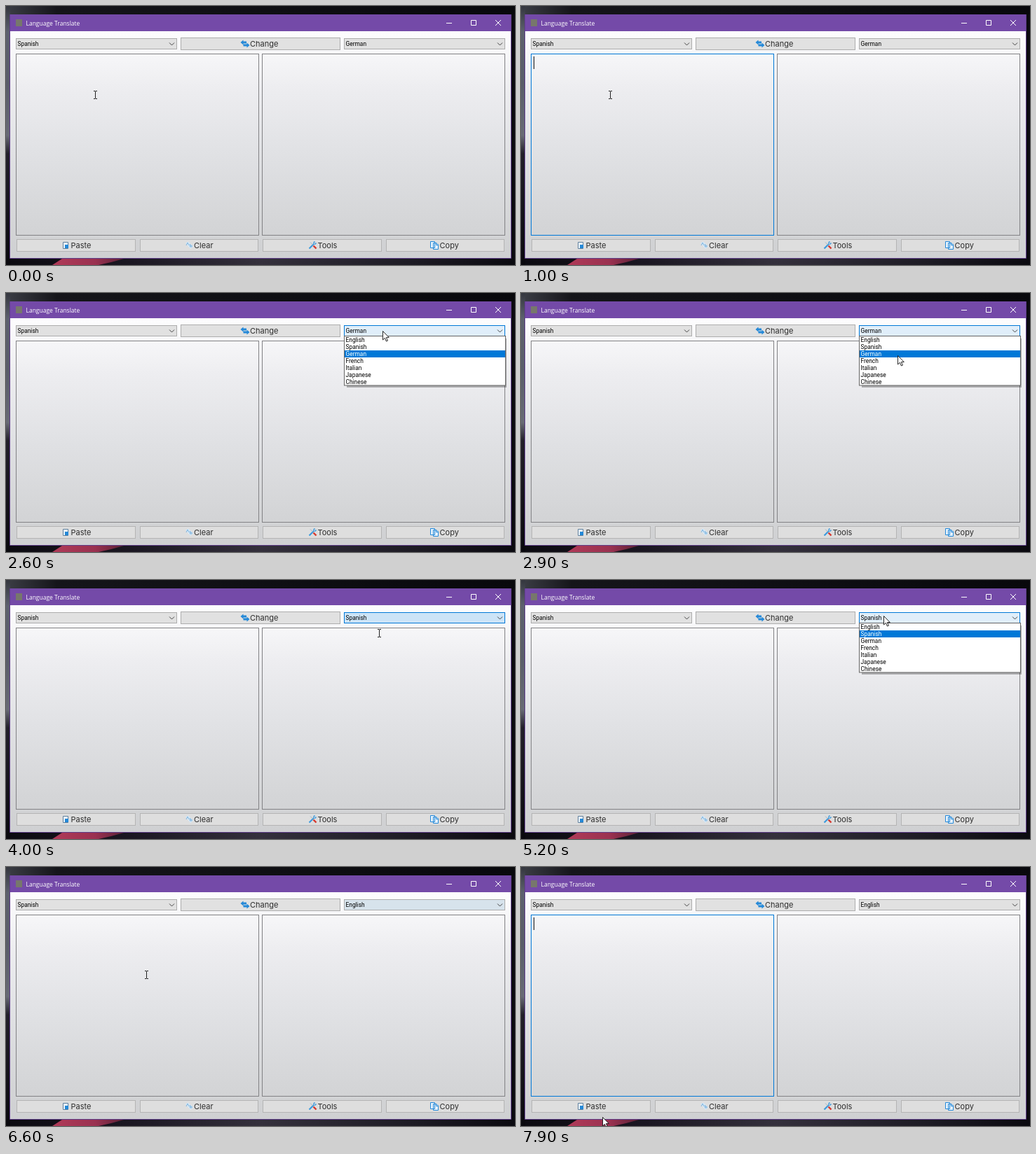
An HTML page that plays this animation: 726 px wide and 370 px high, repeating every 8 s.

```html
<!DOCTYPE html>
<html lang="en">
<head>
<meta charset="utf-8">
<title>Language Translate</title>
<style>
  html, body { margin: 0; width: 100%; height: 100%; overflow: hidden; background: #08080c; }
  svg { display: block; width: 726px; height: 370px; }
  text { font: 8.4px Roboto, sans-serif; fill: #000; white-space: pre; }
  .title { font: 500 8.5px "Open Sans", sans-serif; fill: #fff; }
  .label { font: 11px Inter, sans-serif; fill: #2c2c2c; }
  .thin { fill: none; stroke-width: 1; }
</style>
</head>
<body>
<svg id="stage" viewBox="0 0 726 370">
  <defs>
    <linearGradient id="client" x1="0" y1="0" x2="0" y2="1">
      <stop offset="0" stop-color="#fdfdfe"/>
      <stop offset=".25" stop-color="#ededf0"/>
      <stop offset=".52" stop-color="#e1e2e5"/>
      <stop offset=".85" stop-color="#d4d5d7"/>
      <stop offset="1" stop-color="#cfd0d2"/>
    </linearGradient>
    <linearGradient id="edge" x1="0" y1="0" x2="0" y2="1">
      <stop offset="0" stop-color="#34363e"/>
      <stop offset=".1" stop-color="#5d616e"/>
      <stop offset=".3" stop-color="#5a5d69"/>
      <stop offset=".5" stop-color="#686a75"/>
      <stop offset=".57" stop-color="#221f29"/>
      <stop offset="1" stop-color="#09080d"/>
    </linearGradient>
    <linearGradient id="top">
      <stop offset="0" stop-color="#3c3e46"/>
      <stop offset=".1" stop-color="#15151a"/>
      <stop offset="1" stop-color="#08080c"/>
    </linearGradient>
    <linearGradient id="bottom">
      <stop offset="0" stop-color="#0b0a10"/>
      <stop offset=".25" stop-color="#1b1722"/>
      <stop offset=".5" stop-color="#34303c"/>
      <stop offset=".8" stop-color="#1d1b24"/>
      <stop offset="1" stop-color="#0b0a10"/>
    </linearGradient>
    <linearGradient id="petal">
      <stop offset="0" stop-color="#b03a58"/>
      <stop offset=".6" stop-color="#9a3150"/>
      <stop offset="1" stop-color="#5c2238"/>
    </linearGradient>
  </defs>

  <!-- desktop -->
  <rect width="726" height="370" fill="#0b0a10"/>
  <rect width="726" height="12" fill="url(#top)"/>
  <rect y="361" width="726" height="9" fill="url(#bottom)"/>
  <rect width="6" height="370" fill="url(#edge)"/>
  <path d="M66 370L80 361H168L150 366L132 370Z" fill="url(#petal)"/>

  <!-- window -->
  <rect x="6" y="36" width="714" height="324" fill="url(#client)"/>
  <rect x="6" y="12" width="714" height="24" fill="#744aa8"/>
  <path class="thin" stroke="#5d3c88" d="M5.500 12V360.500H720.500V12"/>
  <rect x="14" y="19" width="9" height="10" fill="#77776c"/>
  <text class="title" x="28.500" y="27.500">Language Translate</text>
  <path class="thin" stroke="#fff" d="M628 24.500h8M663.500 20.500h7v7h-7zM698 20l8 8M706 20l-8 8"/>

  <g id="controls"></g>

  <!-- swap icon -->
  <path fill="#2589d8" d="M334.500 52l4-3.500v2h4.500v3h-4.500v2zM347.500 56l-4-3.500v2h-5v3h5v2z"/>
  <!-- paste icon -->
  <path d="M81.500 337.500h7v9h-7z" fill="#eef5fb" stroke="#5f7f9c"/>
  <path d="M84 341h5v5h-5z" fill="#2589d8"/>
  <!-- eraser icon -->
  <path d="M256 338.500l4-2l7 7l-4 3.500z" fill="#d5e8f7"/>
  <path class="thin" stroke="#7fb3dc" d="M257 342l2-4l2 4M262.500 340v4h2.500v-2h-2.500"/>
  <!-- tools icon -->
  <path d="M432.500 346.500l7-7" stroke="#3a9ade" stroke-width="2.200"/>
  <path d="M434 337.500l4 4" stroke="#a9b4be"/>
  <path d="M438.500 338.500l2-2M440.500 340.500l2-2" stroke="#3a9ade" stroke-width="1.600"/>
  <path d="M438.500 342.500l4 4" stroke="#d6382f" stroke-width="2.400"/>
  <!-- copy icon -->
  <path d="M605.500 336.500h6v9h-6zM609.500 338.500h4.500l2.500 2.500v6.500h-7z" fill="#e4f1fb" stroke="#2589d8"/>
  <path class="thin" stroke="#2589d8" d="M613.500 338.500v3h3"/>

  <path id="caret" d="M18.500 72v18" stroke="#111"/>

  <g id="list">
    <rect x="486" y="65" width="228" height="70" fill="#000" opacity=".28"/>
    <rect x="482.500" y="61.500" width="230" height="70.500" fill="#fff" stroke="#646464"/>
    <rect id="pick" x="483" width="229" height="10" fill="#0078d7"/>
    <g id="rows"></g>
  </g>

  <path id="arrow" d="M.5-.5v12.500l2.900-2.700l2 4.700l2-.9l-2-4.500h3.900z" fill="#fff" stroke="#111" stroke-width=".9"/>
  <path id="beam" class="thin" stroke="#222" d="M-2.500-5.500H-.5L0-5L.5-5.500H2.500M0-5V5M-2.500 5.500H-.5L0 5L.5 5.500H2.500"/>
</svg>
<script>
const LOOP = 8000, STEP = 100;
const LANGS = ["English", "Spanish", "German", "French", "Italian", "Japanese", "Chinese"];
const CLICK_TEXT = 700, OPEN_1 = 2500, CLOSE_1 = 3900, OPEN_2 = 4900, CLOSE_2 = 5800, CLICK_AGAIN = 6600;
const ROW = 10, LIST_TOP = 62;

// pointer path: time, x, y
const PATH = [
  [0, 127, 127], [1200, 127, 127], [2000, 527, 59.500], [2400, 537, 55], [2600, 537, 55],
  [2900, 537, 90], [3200, 537, 90], [3600, 532, 76], [4100, 532, 76], [4600, 517, 52],
  [5300, 517, 52], [5600, 515, 67], [5900, 515, 67], [6500, 200, 153.500],
  [6900, 200, 153.500], [7800, 115.500, 358], [8000, 115.500, 358]
];

const $ = id => document.getElementById(id);
const show = (el, on) => el.setAttribute("visibility", on ? "visible" : "hidden");
const box = (x, y, w, h, fill, stroke, id = "") =>
  `<rect id="${id}" x="${x + .5}" y="${y + .5}" width="${w - 1}" height="${h - 1}" fill="${fill}" stroke="${stroke}"/>`;
const label = (x, y, s) => `<text class="label" x="${x}" y="${y}">${s}</text>`;
const combo = (x, id) => box(x, 46, 230, 16, "#e1e1e1", "#adadad", id) +
  `<text id="${id}Text" x="${x + 2.5}" y="57.400">Spanish</text>` +
  `<path class="thin" stroke="#444" d="M${x + 219} 52.500l3.500 3.500l3.500-3.500"/>`;

$("controls").innerHTML =
  combo(14, "from") + combo(482, "to") +
  box(249, 45, 228, 18, "#e1e1e1", "#adadad") + label(348, 58, "Change") +
  box(14, 68, 347, 260, "none", "#828285", "input") +
  box(365, 68, 347, 260, "none", "#828285") +
  [[15, 170, 92.5, "Paste"], [191, 169, 268, "Clear"], [366, 170, 444.5, "Tools"], [542, 169, 618.5, "Copy"]]
    .map(([x, w, tx, s]) => box(x, 333, w, 18, "#dedede", "#b4b4b4") + label(tx, 346, s)).join("");

$("rows").innerHTML = LANGS.map((s, i) =>
  `<text x="484.500" y="${LIST_TOP + 8 + i * ROW}">${s}</text>`).join("");

function pointer(t) {
  const i = PATH.findIndex(k => k[0] > t);
  const [t0, x0, y0] = PATH[i - 1], [t1, x1, y1] = PATH[i];
  const p = (t - t0) / (t1 - t0), e = p * p * (3 - 2 * p);
  return [x0 + (x1 - x0) * e, y0 + (y1 - y0) * e];
}

function mix(a, b, p) {
  p = Math.max(0, Math.min(1, p));
  return `rgb(${a.map((v, i) => Math.round(v + (b[i] - v) * p))})`;
}

const GREY = [225, 225, 225], HOVER = [224, 238, 250], ACTIVE = [204, 228, 247];

function comboFill(t, open) {
  if (open) return mix(HOVER, HOVER, 0);
  if (t < OPEN_1) return mix(GREY, HOVER, (t - 2000) / 300);
  if (t < OPEN_2) return mix(ACTIVE, HOVER, (t - 4400) / 300);
  return mix(ACTIVE, GREY, (t - 6300) / 600);
}

function draw(t) {
  const [x, y] = pointer(t);
  const open = t >= OPEN_1 && t < CLOSE_1 || t >= OPEN_2 && t < CLOSE_2;
  const chosen = t < CLOSE_1 ? 2 : t < CLOSE_2 ? 1 : 0;
  const hovered = Math.floor((y - LIST_TOP) / ROW);
  const picked = open && hovered >= 0 ? Math.min(hovered, LANGS.length - 1) : chosen;

  const focusAt = t > CLICK_AGAIN ? CLICK_AGAIN + 100 : CLICK_TEXT;
  const focused = t >= CLICK_TEXT && t < OPEN_1 || t > CLICK_AGAIN;
  $("input").setAttribute("stroke", focused ? "#0078d7" : "#828285");
  show($("caret"), focused && Math.floor((t - focusAt) / 530) % 2 === 0);

  const lit = t > 2000 && t < 6500;
  $("to").setAttribute("fill", comboFill(t, open));
  $("to").setAttribute("stroke", lit ? "#0078d7" : "#adadad");
  $("toText").textContent = LANGS[chosen];

  show($("list"), open);
  $("pick").setAttribute("y", LIST_TOP + picked * ROW);
  [...$("rows").children].forEach((row, i) => row.style.fill = i === picked ? "#fff" : "#000");

  const inText = !open && y > 68 && y < 328;
  show($("beam"), inText);
  show($("arrow"), !inText);
  $("beam").setAttribute("transform", `translate(${Math.round(x) + .5} ${Math.round(y)})`);
  $("arrow").setAttribute("transform", `translate(${Math.round(x)} ${Math.round(y)})`);
}

const start = performance.now();
function tick() {
  const t = (performance.now() - start) % LOOP;
  draw(Math.floor(t / STEP) * STEP);
  requestAnimationFrame(tick);
}
tick();
</script>
</body>
</html>
```
